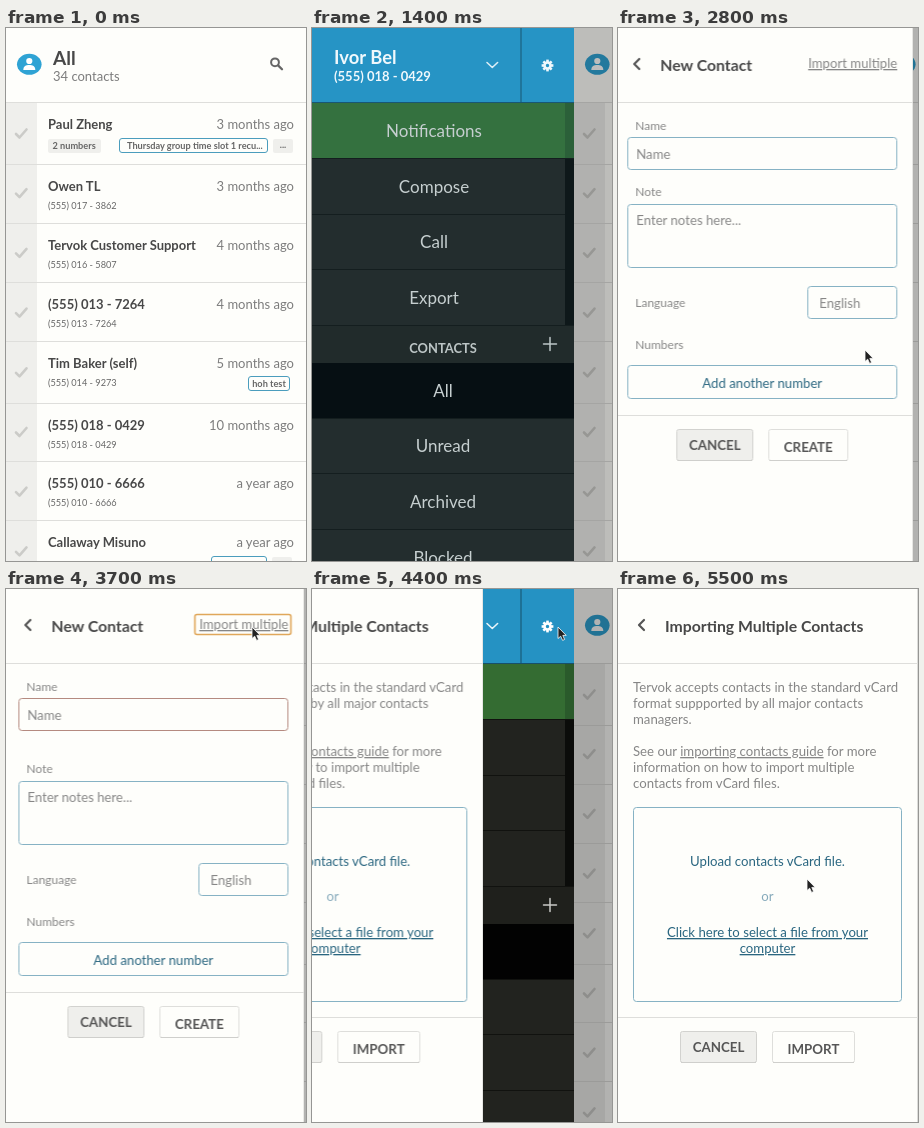
Recreate the animation shown at these times as an HTML page. Size 300 by 533 pixels, loop 8000 ms.

```html
<!DOCTYPE html>
<html lang="en">
<head>
<meta charset="utf-8">
<title>Contacts</title>
<style>
  html, body { margin: 0; width: 100%; height: 100%; overflow: hidden; background: #fefefb; }
  svg { display: block; width: 100vw; height: 100vh; }
  text { font-family: Lato, "Open Sans", sans-serif; font-size: 13.2px; fill: #868686; white-space: pre; }
  .b { font-weight: 700; }
  .mid { text-anchor: middle; }
  .end { text-anchor: end; }
  .u { text-decoration: underline; }
  .name { font-size: 13px; fill: #484848; }
  .date { font-size: 13px; fill: #7c7c7c; }
  .small { font-size: 9.2px; fill: #666; }
  .title { font-size: 15.8px; fill: #484848; }
  .label { font-size: 12px; }
  .item { font-size: 17px; fill: #d2d2cf; }
  .head { font-size: 12.9px; fill: #c8c8c4; }
  .btn { font-size: 13.3px; fill: #565656; }
  .link { fill: #2a6680; }
  .white { fill: #fff; }
  .page { fill: #fefefb; }
  .rule { fill: #dededb; }
  .field { fill: none; stroke: #86b2c4; }
  .line { fill: none; stroke-linecap: round; stroke-linejoin: round; }

  #list, #dim, #tint, #form, #lower, #nameBox, #ring, #upload, #cursor { animation: 8s linear infinite; }
  #list { animation-name: list; }
  #dim { animation-name: dim; }
  #tint { animation-name: tint; }
  #form { animation-name: form; }
  #lower { animation-name: lower; }
  #nameBox { animation-name: invalid; }
  #ring { animation-name: ring; }
  #upload { animation-name: upload; }
  #cursor { animation-name: cursor; }

  @keyframes list {
    0%, 9.875% { transform: translateX(0); animation-timing-function: ease; }
    16.44%, 100% { transform: translateX(262px); }
  }
  @keyframes dim {
    0%, 9.875% { opacity: 0; }
    12.5% { opacity: .22; }
    17.5% { opacity: .26; }
    26.25%, 100% { opacity: .3; }
  }
  @keyframes tint {
    0%, 9.875% { opacity: 1; }
    12.5% { opacity: .74; }
    17.5% { opacity: .08; }
    26.25%, 100% { opacity: 0; }
  }
  @keyframes form {
    0%, 28.63% { transform: translateX(-301px); animation-timing-function: ease; }
    36.25% { transform: translateX(0); }
    46.19% { transform: translateX(0); animation-timing-function: ease; }
    52.44%, 100% { transform: translateX(-301px); }
  }
  @keyframes lower {
    0%, 46.19% { transform: translateY(0); }
    46.2%, 100% { transform: translateY(16px); }
  }
  @keyframes invalid {
    0%, 46.19% { stroke: #86b2c4; }
    46.2%, 100% { stroke: #b58a80; }
  }
  @keyframes ring {
    0%, 46.19% { opacity: 0; }
    46.2%, 100% { opacity: 1; }
  }
  @keyframes upload {
    0%, 53.68% { transform: translateX(-301px); animation-timing-function: ease; }
    57.7%, 100% { transform: translateX(0); }
  }
  @keyframes cursor {
    0%, 21.2% { transform: translate(300px, 400px); opacity: 0; }
    21.21% { transform: translate(292px, 390px); opacity: 1; animation-timing-function: ease-out; }
    26.25%, 39.5% { transform: translate(247px, 322px); opacity: 1; animation-timing-function: ease-in-out; }
    43.75%, 62% { transform: translate(246px, 38px); opacity: 1; animation-timing-function: ease-in-out; }
    68.75%, 100% { transform: translate(189px, 290px); opacity: 1; }
  }
</style>
</head>
<body>
<svg viewBox="0 0 300 533" preserveAspectRatio="none">
  <g id="menu"></g>
  <rect id="tint" width="262" height="533" fill="#38a3d4"/>
  <g id="list"></g>
  <g id="form"></g>
  <g id="upload"></g>
  <path id="cursor" d="M0 0V11.5L2.7 9.2L4.6 13.4L6.6 12.5L4.8 8.4H8.2Z" fill="#222" stroke="#fff" stroke-width=".8"/>
</svg>
<script>
const text = (x, y, cls, str) => `<text x="${x}" y="${y}" class="${cls}">${str}</text>`;
const rect = (x, y, w, h, attrs) => `<rect x="${x}" y="${y}" width="${w}" height="${h}" ${attrs}/>`;
const rule = y => rect(0, y, 300, 1, 'class="rule"');
const box = (x, y, w, h, attrs = '') => rect(x + .5, y + .5, w - 1, h - 1, `rx="3" class="field" ${attrs}`);
const path = (d, color, width) => `<path d="${d}" class="line" stroke="${color}" stroke-width="${width}"/>`;
const fill = (id, parts) => { document.getElementById(id).innerHTML = parts.join(''); };

const back = path('M26 31L21 36L26 41', '#555', 2.2);
const page = rect(0, 0, 300, 533, 'class="page"') + rect(299, 0, 1, 533, 'fill="#dcdcd9"');

function button(x, y, w, label, solid) {
  const paint = solid ? 'fill="#efefec" stroke="#d2d2cf"' : 'fill="#fefefb" stroke="#dededb"';
  return rect(x + .5, y + .5, w - 1, 31, `rx="2" ${paint}`) +
    rect(x + 1, y + 31, w - 2, 1, 'fill="#cfcfcc"') +
    text(x + w / 2, y + (solid ? 21.3 : 22.5), 'btn b mid', label);
}

// Side menu
const gear = Array.from({ length: 8 }, (_, i) =>
  rect(234.2, 31.6, 2.6, 3, `fill="#fff" transform="rotate(${i * 45} 235.5 37.5)"`)).join('');
const items = [
  ['Notifications', 122, 109], ['Compose', 122, 165], ['Call', 122, 220], ['Export', 122, 276],
  ['All', 131, 369], ['Unread', 131, 424], ['Archived', 131, 479.5], ['Blocked', 131, 535.5]
];
fill('menu', [
  rect(0, 0, 262, 533, 'fill="#22231f"'),
  rect(0, 0, 262, 75, 'fill="#2592c3"'),
  rect(0, 74, 262, 1, 'fill="#17506a"'),
  rect(208.5, 0, 1, 75, 'fill="#17506a"'),
  text(22, 36, 'b white" style="font-size:18.4px', 'Ivor Bel'),
  text(22, 53, 'b white" style="font-size:13px', '(555) 018 - 0429'),
  path('M175 34.5L180.3 39.5L185.6 34.5', '#e8f4f9', 1.6),
  gear,
  '<circle cx="235.5" cy="37.5" r="3" fill="none" stroke="#fff" stroke-width="2.6"/>',
  rect(0, 75, 253, 55, 'fill="#346c32"'),
  rect(253, 75, 9, 55, 'fill="#2a5a2b"'),
  rect(0, 298, 262, 37, 'fill="#1f201c"'),
  rect(0, 335, 262, 55, 'fill="#020202"'),
  ...[130, 186, 241, 297, 390, 445, 501].map(y => rect(0, y, 262, 1, 'fill="#11120f"')),
  rect(253, 131, 9, 166, 'fill="#0b0c0a"'),
  text(131, 324.5, 'head b mid', 'CONTACTS'),
  path('M231.5 316H244.5M238 309.5V322.5', '#c9c9c6', 1.5),
  ...items.map(([s, x, y]) => text(x, y, 'item mid', s))
]);

// Contact list
const rows = [
  [75, 'Paul Zheng', '3 months ago', ''],
  [137, 'Owen TL', '3 months ago', '(555) 017 - 3862'],
  [196, 'Tervok Customer Support', '4 months ago', '(555) 016 - 5807'],
  [255, '(555) 013 - 7264', '4 months ago', '(555) 013 - 7264'],
  [314, 'Tim Baker (self)', '5 months ago', '(555) 014 - 9273'],
  [376, '(555) 018 - 0429', '10 months ago', '(555) 018 - 0429'],
  [434, '(555) 010 - 6666', 'a year ago', '(555) 010 - 6666'],
  [493, 'Callaway Misuno', 'a year ago', '']
];
const row = ([y, name, date, sub], i) =>
  rule(y - 1) +
  path(`M10 ${106 + i * 59.7}l3.5 3.5l7 -8`, '#cbcbc8', 2.6) +
  text(42, y + 25.5, 'name b', name) +
  text(288, y + 25.5, 'date end', date) +
  text(42, y + 44.3, 'small', sub);
const chip = (x, y, w, h) => rect(x, y, w, h, 'rx="2" fill="#efefec"');
const tag = (x, y, w, h) => rect(x + .5, y + .5, w - 1, h - 1, 'rx="2.5" fill="#fefefb" stroke="#4b9dbd"');
fill('list', [
  rect(0, 0, 300, 533, 'class="page"'),
  '<ellipse cx="23.3" cy="36.3" rx="12.3" ry="10.5" fill="#2fa3d4"/>',
  '<circle cx="23.3" cy="33" r="3.1" fill="#fff"/>',
  '<path d="M17.3 42C17.3 38 20 37 23.3 37S29.3 38 29.3 42Z" fill="#fff"/>',
  text(47, 36.5, 'b" style="font-size:19px;fill:#484848', 'All'),
  text(47, 53, 'date', '34 contacts'),
  '<circle cx="269" cy="34.3" r="3.9" fill="none" stroke="#666" stroke-width="2"/>',
  path('M272.3 37.6L276 41.3', '#666', 2.3),
  rect(0, 75, 31, 458, 'fill="#efefec"'),
  ...rows.map(row),
  chip(42, 111, 53, 14),
  text(46.5, 121, 'small b', '2 numbers'),
  tag(113, 110, 149, 15),
  text(121, 121, 'small b', 'Thursday group time slot 1 recu...'),
  chip(267, 111, 20, 14),
  text(277, 120, 'small b mid', '...'),
  tag(242, 348, 42, 15),
  text(263, 359, 'small b mid', 'hoh test'),
  tag(205, 528, 56, 15),
  chip(266, 529, 20, 14),
  rect(0, 0, 300, 533, 'id="dim"')
]);

// New contact form
fill('form', [
  page, back, rule(74),
  text(47, 42.5, 'title b', 'New Contact'),
  text(284, 40, 'end u', 'Import multiple'),
  rect(190.5, 25.5, 96, 20, 'id="ring" rx="2" fill="none" stroke="#e0a75a" stroke-width="1.6"'),
  text(22, 101.5, 'label', 'Name'),
  box(14, 109, 270, 33, 'id="nameBox"'),
  text(23, 130.5, '', 'Name'),
  '<g id="lower">',
  text(22, 167.5, 'label', 'Note'),
  box(14, 176, 270, 64),
  text(23, 197, '', 'Enter notes here...'),
  text(22, 279, 'label', 'Language'),
  box(194, 258, 90, 33),
  text(206, 280, '', 'English'),
  text(22, 321, 'label', 'Numbers'),
  box(14, 337, 270, 34),
  text(149, 359.5, 'link mid', 'Add another number'),
  rule(387),
  button(63, 401, 77, 'CANCEL', true),
  button(155, 401, 80, 'CREATE', false),
  '</g>'
]);

// Import page
fill('upload', [
  page, back, rule(74),
  text(47, 42.5, 'title b', 'Importing Multiple Contacts'),
  text(15, 103, '', 'Tervok accepts contacts in the standard vCard'),
  text(15, 119, '', 'format suppported by all major contacts'),
  text(15, 135, '', 'managers.'),
  text(15, 167, '', 'See our <tspan class="u">importing contacts guide</tspan> for more'),
  text(15, 183, '', 'information on how to import multiple'),
  text(15, 199, '', 'contacts from vCard files.'),
  box(15, 218, 269, 195),
  text(149.5, 276.5, 'link mid', 'Upload contacts vCard file.'),
  text(149.5, 312, 'mid" style="fill:#86aabb', 'or'),
  text(149.5, 348, 'link mid u', 'Click here to select a file from your'),
  text(149.5, 364, 'link mid u', 'computer'),
  rule(428),
  button(62, 442, 77, 'CANCEL', true),
  button(154, 442, 83, 'IMPORT', false)
]);
</script>
</body>
</html>
```
